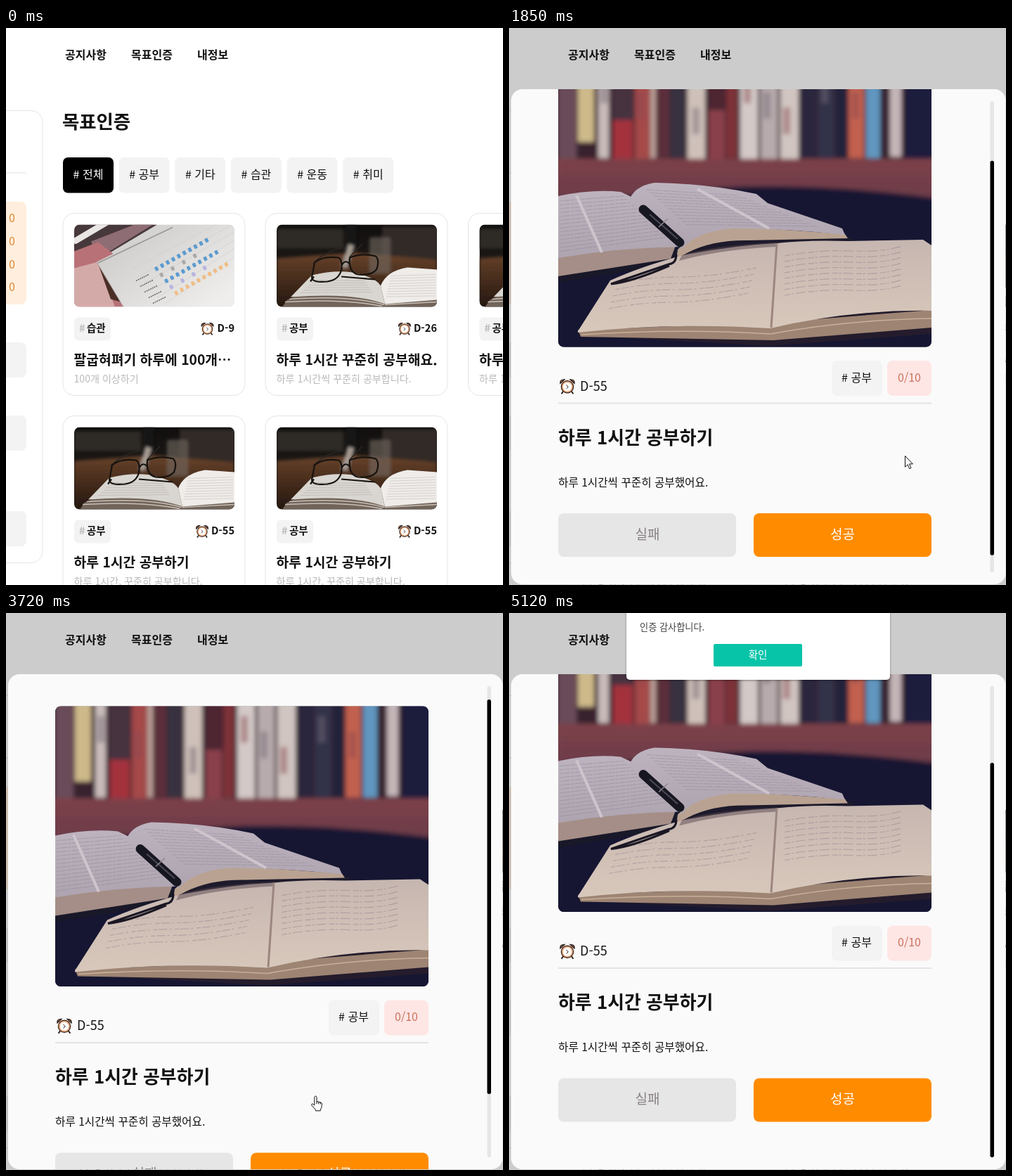
These frames come from a looping animation (707 px wide and 792 px high, 6120 ms). An HTML page:

```html
<!DOCTYPE html>
<html lang="ko">
<head>
<meta charset="utf-8">
<style>
html, body { margin: 0; width: 100%; height: 100%; overflow: hidden; background: #fff; }
svg { display: block; width: 707px; height: 792px; }
text { font-family: "Noto Sans CJK KR", "Noto Sans CJK JP", sans-serif; white-space: pre; }
</style>
</head>
<body>
<svg id="stage" viewBox="0 0 707 792" xmlns="http://www.w3.org/2000/svg"></svg>
<script>
const LOOP = 6120, TICK = 200 / 3;

const box = (x, y, w, h, r, fill, more = '') =>
  `<rect x="${x}" y="${y}" width="${w}" height="${h}" rx="${r}" fill="${fill}" ${more}/>`;
const shape = (d, fill, more = '') => `<path d="${d}" fill="${fill}" ${more}/>`;
const line = (d, color, w, more = '') =>
  `<path d="${d}" fill="none" stroke="${color}" stroke-width="${w}" ${more}/>`;
// cy is the optical middle of the line of text
const label = (x, cy, size, str, { w = 400, c = '#111', a = 'start' } = {}) =>
  `<text x="${x}" y="${cy + size * .37}" font-size="${size}" font-weight="${w}" fill="${c}" text-anchor="${a}">${str}</text>`;
const repeat = (n, f) => Array.from({ length: n }, (_, i) => f(i)).join('');
const grad = (id, a, b, dir = 'x2="0" y2="1"') =>
  `<linearGradient id="${id}" ${dir}><stop stop-color="${a}"/><stop offset="1" stop-color="${b}"/></linearGradient>`;

const clock = (x, y, s = 1) => `<g transform="translate(${x} ${y}) scale(${s})" stroke="#2b1c18">
  <path d="M-5 6l-2 3M5 6l2 3" stroke-width="1.6"/>
  <path d="M-8.3-3.5Q-9-8-3.5-8zM8.3-3.5Q9-8 3.5-8z" fill="#e8894a" stroke-width="1.2"/>
  <circle r="7.2" cy=".6" fill="#eda06a" stroke-width="1"/>
  <circle r="5.6" cy=".6" fill="#fff" stroke="#c98a60" stroke-width=".5"/>
  <path d="M-1.3-1.8L1 .8-1.3 2.8" fill="none" stroke-width=".8"/></g>`;

function glasses() {
  return box(0, 0, 228, 117, 0, 'url(#night)') +
    `<g filter="url(#soft)">` +
    box(0, 6, 95, 28, 0, '#2d2925') + box(98, 0, 16, 45, 0, '#191513') +
    box(150, 3, 80, 46, 0, '#302b28') +
    shape('M0 48L110 40 228 50V117H0z', 'url(#wood)') +
    box(132, 18, 30, 52, 4, '#746a62', 'opacity=".6"') +
    shape('M92 60L102 28 110 30 100 62z', '#a59b93') + '</g>' +
    shape('M15 107L40 96 140 104 150 112 228 106V117H8z', '#71645a') +
    shape('M20 103L50 72Q92 62 120 71 142 77 148 87L154 113Q110 96 20 103z', '#d9d5d0') +
    shape('M148 87Q156 66 186 61L228 64V107L154 113z', '#efece9') +
    line('M18 106Q104 100 153 114M12 110Q96 105 150 116M154 114L228 110', '#c9bfb6', 1.4) +
    repeat(9, i => line(`M${162 - i * .8} ${73 + i * 3.7}L226 ${71 + i * 3.8}`, '#c4bfbb', .6)) +
    repeat(6, i => line(`M${54 - i * 4} ${79 + i * 3.6}L${126 + i * 2} ${80 + i * 3.2}`, '#b5afa9', .6)) +
    line('M52 55Q70 37 96 33M104 46L122 27', '#2b2522', 1.6) +
    line('M54 54Q66 44 88 47 94 50 92 65 88 79 72 81 50 83 50 75zM104 47Q122 40 141 45 147 51 142 64 134 73 116 71 102 68 104 47zM93 57Q98 49 104 56M48 81L53 74M92 74L140 78', '#17130f', 2.2, 'stroke-linejoin="round"');
}

function planner() {
  const rows = [['#5b9bd0', 10, 1], ['#aaa9a8', 8, 2], ['#5b9bd0', 10, 1], ['#b7b3df', 8, 2], ['#f0bd84', 10, 1]];
  const marks = rows.map(([color, n, step], r) => repeat(n, i => i % step ? '' :
    box(115 + r * 7 + i * 7.9, 60 + r * 8.6 - i * 4.5, 4.6, 6, 1, color,
      `transform="rotate(-28 ${117 + r * 7 + i * 7.9} ${63 + r * 8.6 - i * 4.5})"`))).join('');
  const notes = repeat(5, r => line(`M${88 + r * 6} ${80 + r * 8}l18-9`, '#6f6d6e', 1.6, 'stroke-dasharray="2 1"'));
  return box(0, 0, 228, 117, 0, 'url(#paper)') +
    shape('M0 0H118L34 50 0 70z', '#47383c') +
    shape('M24 24L86 0H112L34 48z', '#8e6d74') +
    line('M2 23L46-3', '#e9e6e4', 9, 'stroke-linecap="round"') +
    shape('M0 38L34 25 64 48 70 117H0z', '#b87177') +
    shape('M0 62L34 53 58 117H0z', '#d4aaa9') +
    shape('M34 56L58 70 66 110 52 106z', '#4b2f26') +
    shape('M32 53L140 0H228V117H70z', 'url(#paper)') +
    line('M33 55L140 4', '#9c9897', 1.6) + line('M33 55L70 117', '#aaa5a2', 1) +
    repeat(6, i => line(`M${82 + i * 9} ${64 + i * 10}L228 ${-14 + i * 12}`, '#cfccca', .6)) +
    marks + notes;
}

function library() {
  const spines = [
    [0, 26, 132, '#6b4b5a'], [28, 23, 107, '#cdb98a'], [57, 15, 130, '#c9bbba'],
    [77, 30, 76, '#46303f'], [78, 28, 135, '#a3303e', 76], [109, 21, 132, '#a5484a'],
    [131, 8, 130, '#bd9f98'], [142, 16, 130, '#5c2f3a'], [160, 20, 130, '#393340'],
    [184, 25, 134, '#cfc1ba'], [214, 23, 62, '#4d2832'], [214, 23, 132, '#8a414b', 62],
    [239, 16, 130, '#7d3039'], [259, 25, 134, '#d3c9c7'], [288, 24, 134, '#b8abad'],
    [316, 26, 134, '#d0c5c1'], [345, 22, 130, '#29283c'], [369, 24, 130, '#33334a'],
    [395, 15, 130, '#24223a'], [413, 22, 130, '#c2604f'], [438, 20, 130, '#6196bf'],
    [472, 16, 128, '#c4b5b8'], [493, 45, 134, '#1e1c3c']];
  const bands = [60, 112, 191, 264, 292, 320, 374, 418];
  return box(0, 0, 531, 399, 0, '#281c2d') + '<g filter="url(#blur)">' +
    box(-9, -9, 550, 150, 0, '#38232f') +
    spines.map(([x, w, end, c, top = -8]) => box(x, top, w, end - top, 0, c)).join('') +
    bands.map((x, i) => box(x, 14 + i % 3 * 22, 10, 38, 0, i % 2 ? '#8c4a50' : '#756a77', 'opacity=".5"')).join('') +
    box(-9, 131, 550, 80, 0, 'url(#shelf)') +
    shape('M-9 196L150 178Q330 158 545 188V410H-9z', '#141732') + '</g>' +
    // upper book
    shape('M0 276L162 255 178 268 152 282 0 307z', '#191829') +
    shape('M0 268L168 252 160 273 0 298z', '#a58e87') +
    shape('M0 184Q48 174 89 178L108 187 175 256Q88 257 0 272z', 'url(#page)') +
    shape('M176 266Q204 240 262 239L422 243 410 252 270 256Q208 256 167 282z', '#1d1a2b') +
    shape('M170 260Q198 230 252 227L408 238 412 244 270 247Q208 246 168 274z', '#b9a291') +
    shape('M100 193Q106 170 137 165 210 166 282 181L298 194 404 230 408 239Q322 230 250 230 196 234 176 259z', 'url(#page)') +
    repeat(12, i => line(`M${126 + i * 5} ${175 + i * 4.5}L${258 + i * 10} ${183 + i * 4}`, '#8a8090', 1.2, 'stroke-dasharray="7 1 3 1" opacity=".4"')) +
    repeat(14, i => line(`M2 ${191 + i * 5.5}L${94 + i * 4.6} ${184 + i * 4.5}`, '#8a8090', 1.2, 'stroke-dasharray="5 1 9 1" opacity=".4"')) +
    line('M26 183L62 264M198 174L300 230', '#cdc4cc', 4) +
    // lower book
    shape('M30 382L90 300 180 270 310 252 531 252V380L300 397Z', '#241c2c') +
    shape('M28 374L303 364 531 346V371L306 389 32 384z', '#9d8473') +
    shape('M28 376L74 304Q118 284 178 268 250 254 311 251L302 372Q160 363 28 378z', 'url(#leaf)') +
    shape('M311 251Q355 246 412 248L519 246 531 254V347Q418 345 302 372z', 'url(#leaf)') +
    shape('M176 268Q220 254 311 250V256Q230 260 172 276z', '#5d4a50', 'opacity=".5"') +
    line('M311 251L303 371', '#9c867f', 3) +
    line('M33 381Q170 372 302 380 410 360 531 358', '#c9b09a', 1.6) +
    repeat(5, i => line(`M${84 - i * 3} ${308 + i * 9}q45-9 90-9t108-13`, '#887782', 1.2, 'stroke-dasharray="6 2 12 3 3 5" opacity=".4"')) +
    repeat(8, i => line(`M322 ${269 + i * 8}q50-9 95-7t72-7`, '#827282', 1.1, 'stroke-dasharray="8 2 3 3 14 4" opacity=".4"')) +
    line('M168 267Q168 280 157 281L75 309Q105 306 158 283', '#1a1723', 3) +
    line('M121 203L173 250', '#171722', 13, 'stroke-linecap="round"') +
    line('M130 210L170 245', '#4d4958', 2) + line('M143 228L156 216', '#8e8790', 1.5);
}

const thumb = (x, y, id) =>
  `<g transform="translate(${x} ${y})" clip-path="url(#thumb)"><use href="#${id}"/></g>`;

function card(x, y, tag, days, title, note, photo = 'glasses') {
  const w = days.length > 3 ? 32 : 24.5;
  return box(x, y, 259, 259, 16, '#fff', 'stroke="#e5e5e5"') + thumb(x + 16, y + 16, photo) +
    box(x + 16, y + 148, 52, 33, 6, '#f3f3f3') +
    label(x + 23, y + 163.5, 14.5, '#', { w: 700, c: '#bbb' }) +
    label(x + 34, y + 163.5, 14.5, tag, { w: 700 }) +
    clock(x + 230 - w, y + 164) +
    label(x + 244, y + 163.5, 14.6, days, { w: 700, a: 'end' }) +
    label(x + 15.5, y + 208, 19.3, title, { w: 700 }) +
    label(x + 15.5, y + 235, 14.1, note, { c: '#b9b9b9' });
}

function page() {
  const nav = [[84, '공지사항'], [178, '목표인증'], [272, '내정보']];
  const tags = ['전체', '공부', '기타', '습관', '운동', '취미'];
  const short = '하루 1시간 공부하기', daily = '하루 1시간, 꾸준히 공부합니다.';
  return box(0, 0, 707, 792, 0, '#fff') +
    nav.map(([x, s]) => label(x, 38, 16, s, { w: 700 })).join('') +
    box(-60, 117.5, 112, 643, 16, '#fff', 'stroke="#e5e5e5"') +
    line('M0 206H29', '#e3e3e3', 1) +
    box(-20, 247, 49, 146, 8, '#ffeedd') +
    repeat(4, i => label(4, 270 + i * 32.8, 16, '0', { c: '#d98a32' })) +
    [447, 551, 687].map(y => box(-20, y, 49, 50, 8, '#f3f3f3')).join('') +
    label(80, 133, 26.4, '목표인증', { w: 700 }) +
    tags.map((s, i) => box(81 + i * 79.65, 184, 72, 50.5, 7, i ? '#f3f3f3' : '#000') +
      label(117 + i * 79.65, 208.5, 16, '# ' + s, { w: i ? 400 : 500, c: i ? '#111' : '#fff', a: 'middle' })).join('') +
    card(81, 263.5, '습관', 'D-9', '팔굽혀펴기 하루에 100개⋯', '100개 이상하기', 'planner') +
    card(369, 263.5, '공부', 'D-26', '하루 1시간 꾸준히 공부해요.', '하루 1시간씩 꾸준히 공부합니다.') +
    card(657.5, 263.5, '공부', 'D-55', short, daily) +
    card(81, 551.5, '공부', 'D-55', short, daily) +
    card(369, 551.5, '공부', 'D-55', short, daily);
}

function modal() {
  const body = `<g transform="translate(70 155)" clip-path="url(#cover)">${library()}</g>` +
    clock(83, 609.5, 1.2) + label(101, 609, 18, 'D-55') +
    box(459, 573, 72, 50, 8, '#f3f3f3') + label(494.5, 597, 16, '# 공부', { a: 'middle' }) +
    box(538, 573, 63, 50, 8, '#fee6e5') + label(569.5, 597, 16, '0/10', { c: '#cb705b', a: 'middle' }) +
    line('M70 633.5H601', '#e4e4e4', 2) +
    label(70, 682, 25.9, '하루 1시간 공부하기', { w: 700 }) +
    label(70, 746, 15.65, '하루 1시간씩 꾸준히 공부했어요.') +
    box(70, 790, 253, 62, 8, '#e6e6e6') + label(197, 819.5, 19, '실패', { c: '#888085', a: 'middle' }) +
    box(348, 790, 253, 62, 8, '#ff8c00') + label(474.5, 819.5, 19, '성공', { w: 500, c: '#fff', a: 'middle' });
  return box(0, 0, 707, 792, 0, '#000', 'opacity=".2"') + box(3, 87, 703.5, 704, 16, '#fafafa') +
    `<g clip-path="url(#view)"><g id="body">${body}</g></g>` +
    box(684.5, 104, 5.5, 670, 2.75, '#e6e6e6') + box(684.5, 104, 5.5, 561, 2.75, '#000', 'id="thumbBar"');
}

const dialog = () => box(167, -40, 375, 135, 5, '#fff', 'filter="url(#shadow)"') +
  label(186, 20, 13.2, '인증 감사합니다.', { c: '#444' }) +
  box(291, 44, 126, 32, 2, '#07c4a9') + label(354, 60, 14.5, '확인', { c: '#fff', a: 'middle' });

const defs = `<defs>
  ${grad('night', '#110f0e', '#292421')}${grad('wood', '#68422a', '#24170f')}
  ${grad('paper', '#c7c6c4', '#efeeec', 'x2="1" y2=".8"')}${grad('shelf', '#7d4249', '#643848')}
  ${grad('page', '#bdb3bf', '#aea4b0')}${grad('leaf', '#c6b6b0', '#d8c8bb')}
  <clipPath id="thumb"><rect width="228" height="117" rx="8"/></clipPath>
  <clipPath id="cover"><rect width="531" height="398.5" rx="8"/></clipPath>
  <clipPath id="view"><rect x="3" y="87" width="703.5" height="704" rx="16"/></clipPath>
  <filter id="soft"><feGaussianBlur stdDeviation="2"/></filter>
  <filter id="blur"><feGaussianBlur stdDeviation="3.2"/></filter>
  <filter id="shadow" x="-10%" y="-10%" width="120%" height="125%"><feDropShadow dx="0" dy="1" stdDeviation="1.5" flood-opacity=".4"/></filter>
  <g id="glasses">${glasses()}</g><g id="planner">${planner()}</g></defs>`;

const stage = document.getElementById('stage');
stage.innerHTML = defs + page() +
  `<g id="modal">${modal()}</g><g id="dialog">${dialog()}</g>
  <g id="cursor"><circle id="press" r="11.7" fill="#ffc800" opacity=".92"/>
  <path id="arrow" d="M.5.5V16.2L4.1 12.8 6.6 18.6 9 17.6 6.5 11.9H11.4z" fill="#fff" stroke="#111"/>
  <path id="hand" transform="translate(-6.2 -1)" d="M5 14V2.6a1.6 1.6 0 0 1 3.2 0V8.5l5.8 1.4q1.7.6 1.7 2.3l-.7 5-1.5 3v1.6H6.6v-1.6L1 14q-.7-1.7.9-2.1 1.2 0 3.1 2.1zM8.2 8.5v3.5M11 9.3v3M13.5 10v2.5" fill="#fff" stroke="#111"/></g>`;

const parts = {};
for (const id of ['modal', 'body', 'thumbBar', 'dialog', 'cursor', 'press', 'arrow', 'hand'])
  parts[id] = document.getElementById(id);

// keys are [tick, value, ...]
const cursorKeys = [[0, 661, 772], [3, 537, 613], [12, 537, 613], [14, 552, 618], [16, 552, 618],
  [18, 563, 608], [25, 563, 608], [29, 547, 601], [33, 270, 641], [35, 270, 641], [42, 440, 687],
  [60, 440, 687], [61, 450, 682], [62, 450, 682], [70, 381, 494], [73, 326, 768]];
const scrollKeys = [[19, 0], [20, 38.5], [21, 72], [22, 91], [23, 100], [25, 100], [26, 109],
  [27, 119], [28, 126], [29, 128.5], [49, 128.5], [50, 105], [51, 62], [52, 34.5], [53, 22.5],
  [54, 36], [55, 70], [56, 100], [57, 120], [58, 128.5]];
const dialogKeys = [[64, -105], [65, -70], [66, -38], [67, -15], [68, -4], [69, 0]];

function at(keys, k) {
  const n = keys.findIndex(key => key[0] >= k);
  if (n < 1) return keys[n ? keys.length - 1 : 0].slice(1);
  const a = keys[n - 1], b = keys[n], p = (k - a[0]) / (b[0] - a[0]);
  return a.slice(1).map((v, i) => v + (b[i + 1] - v) * p);
}
const show = (el, on) => el.setAttribute('visibility', on ? 'visible' : 'hidden');
const move = (el, x, y) => el.setAttribute('transform', `translate(${x} ${y})`);

function draw(t) {
  const k = t < 190 ? -1 : Math.floor((t - 172) / TICK);
  const [x, y] = at(cursorKeys, k), [scroll] = at(scrollKeys, k);
  parts.modal.setAttribute('opacity', k < 8 ? 0 : k < 9 ? .6 : 1);
  move(parts.body, 0, -scroll);
  move(parts.thumbBar, 0, scroll * 109 / 128.5);
  move(parts.dialog, 0, at(dialogKeys, k)[0]);
  parts.cursor.setAttribute('display', k >= 0 && k < 74 ? 'inline' : 'none');
  move(parts.cursor, x, y);
  const hand = k < 8 ? x < 628 : k > 38 && k < 64;
  show(parts.hand, hand);
  show(parts.arrow, !hand);
  show(parts.press, k === 6 || k === 7 || k === 61);
}

function loop() {
  draw(performance.now() % LOOP);
  requestAnimationFrame(loop);
}
loop();
</script>
</body>
</html>
```
